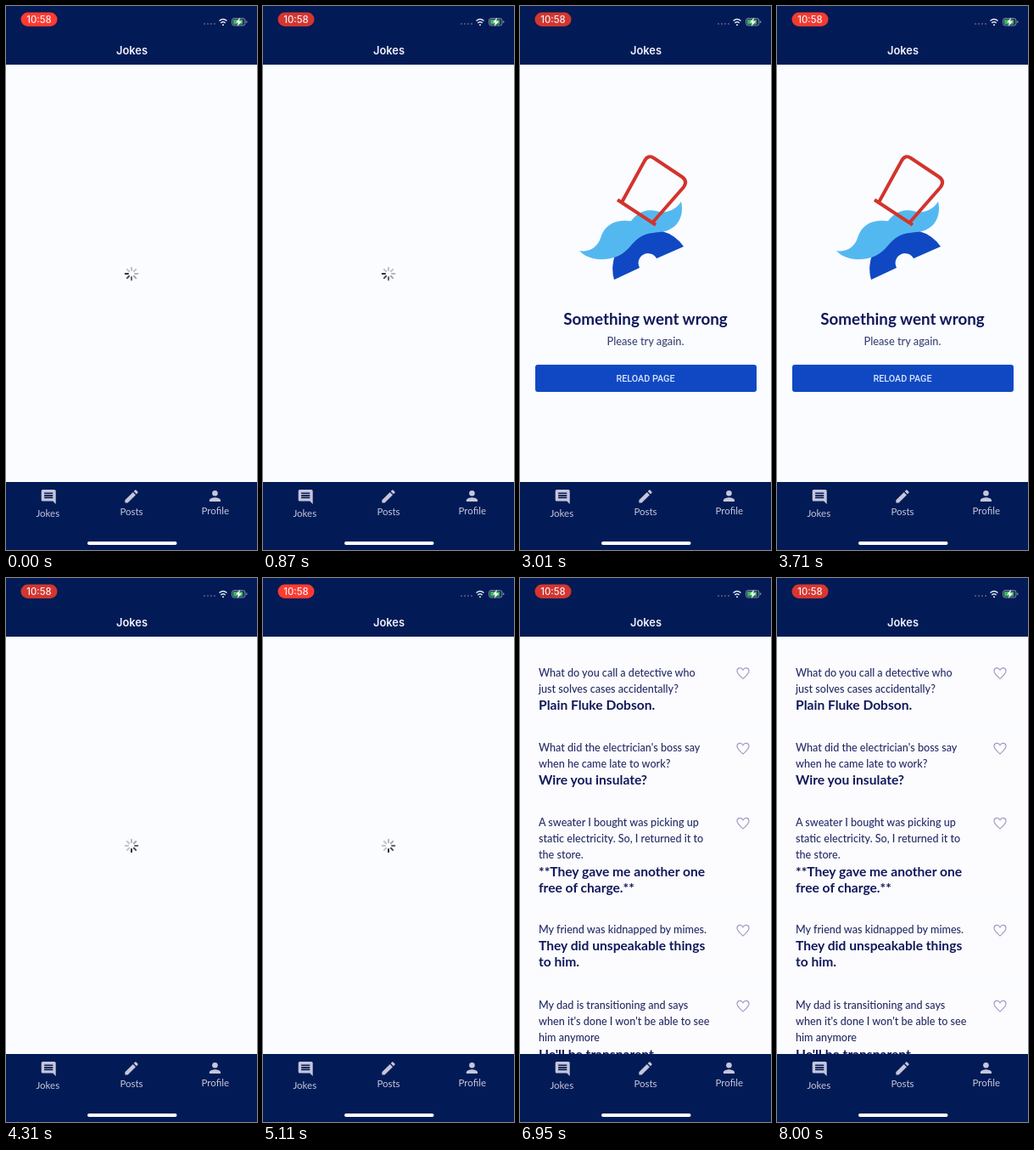
An HTML page that plays this animation: 296x640 px, repeating every 8050 ms.

```html
<!DOCTYPE html>
<html lang="en">
<head>
<meta charset="utf-8">
<title>Jokes</title>
<style>
  html, body { margin: 0; width: 100%; height: 100%; overflow: hidden; background: #fafcff; }
  svg { display: block; width: 296px; height: 640px; }
  text { font-family: Lato, "Open Sans", sans-serif; }
  .status, .title { font-family: Inter, Roboto, sans-serif; fill: #f0f0fa; text-anchor: middle; }
  .status { font-size: 11.3px; font-weight: 500; }
  .title { font-size: 12.9px; font-weight: 600; }
  .mid { text-anchor: middle; }
  .tabs { fill: #c6c6da; font-size: 11.5px; }
  .heading { font-size: 18.8px; font-weight: 700; fill: #10185a; }
  .hint { font-size: 12.8px; font-weight: 500; fill: #3c4474; }
  .button { font: 500 10.8px Roboto, sans-serif; fill: #d8e6fa; }
  .setup { font-size: 12.6px; font-weight: 500; fill: #242c66; }
  .punch { font-size: 15.6px; font-weight: 700; fill: #10185a; }
  .heart { fill: none; stroke: #a49cc8; stroke-width: 1.2; }
  .card { fill: #fcfcfe; }
</style>
</head>
<body>
<svg viewBox="0 0 296 640">
  <rect width="296" height="640" fill="#fafcff"/>

  <g id="loader" stroke-width="2" stroke-linecap="round" transform="translate(148 315)"></g>

  <g id="error">
    <path fill="#1048c4" d="M111 322A46 46 0 0 1 193 283L161 297A11 11 0 0 0 141 308Z"/>
    <path fill="#54b8f0" d="M70 288C82 290 91 284 95 273C99 259 111 250 131 253C138 243 149 238 160 241C172 245 184 240 190 230C194 247 186 261 171 265C160 267 152 266 143 271C131 278 129 288 116 294C101 301 80 299 70 288Z"/>
    <g fill="none" stroke="#d2342c" stroke-width="4">
      <path d="M120 231L147 182Q151 174.500 158 179L191 201Q198 206 193 213L157 254"/>
      <path d="M115 228L160 257.500"/>
    </g>
    <text class="mid heading" x="148" y="375">Something went wrong</text>
    <text class="mid hint" x="148" y="399">Please try again.</text>
    <rect x="18" y="422" width="261" height="32" rx="3" fill="#1048c4"/>
    <text class="mid button" x="148" y="442">RELOAD PAGE</text>
  </g>

  <g id="list"></g>

  <g fill="#021b56">
    <rect width="296" height="69"/>
    <rect y="560" width="296" height="80"/>
  </g>
  <rect id="pill" x="17.500" y="7.500" width="43" height="16.500" rx="8.250"/>
  <text class="status" x="39" y="20">10:58</text>
  <text class="title" x="148.500" y="57">Jokes</text>

  <path d="M233 21H247" stroke="#4c4880" stroke-width="2" stroke-dasharray="2 2"/>
  <g fill="none" stroke="#e4e4f2" stroke-width="1.500">
    <path d="M251.500 17.500Q256 13.500 260.500 17.500M253.300 20Q256 17.500 258.700 20"/>
    <path d="M255 22L256 23L257 22Z" fill="#e4e4f2" stroke-width="1"/>
  </g>
  <rect x="266.500" y="14.500" width="15.500" height="8.500" rx="2.500" fill="#26345c" stroke="#7c84a8"/>
  <rect x="268" y="16" width="11" height="5.500" rx="1" fill="#38b65c"/>
  <path d="M283.700 17.500V20" stroke="#7c84a8" stroke-width="1.300"/>
  <path d="M276 13.500L271 19.500H274L272.800 24L278 18H275Z" fill="#fff"/>

  <g class="tabs mid">
    <path transform="translate(40 567.300) scale(.85)" d="M22 4c0-1.100-.9-2-2-2H4c-1.100 0-2 .9-2 2v12c0 1.100.9 2 2 2h14l4 4zM18 14H6v-2h12zm0-3H6V9h12zm0-3H6V6h12z"/>
    <path transform="translate(137.800 566.700) scale(.85)" d="M3 17.250V21h3.750L17.810 9.940l-3.750-3.750zM20.710 7.040q.7-.7 0-1.410l-2.340-2.340q-.7-.7-1.410 0l-1.830 1.830 3.750 3.750z"/>
    <g transform="translate(236.600 566.700) scale(.82)">
      <circle cx="12" cy="8" r="4"/>
      <path d="M12 14c-2.670 0-8 1.340-8 4v2h16v-2c0-2.660-5.330-4-8-4z"/>
    </g>
    <text x="49.300" y="600.500">Jokes</text>
    <text x="148" y="599">Posts</text>
    <text x="246.800" y="598">Profile</text>
  </g>
  <rect x="96" y="630" width="105.500" height="4" rx="2" fill="#fff"/>
</svg>
<script>
const LOOP = 8050;
const ERROR_AT = 1000, RELOAD_AT = 4250, LIST_AT = 6800;
const SPOKES = 8, SPOKE_MS = 100;
const PULSE_MS = 1280;

// Each joke: baseline of its first line, setup lines, punchline lines
const jokes = [
  [115.5, ["What do you call a detective who", "just solves cases accidentally?"], ["Plain Fluke Dobson."]],
  [204, ["What did the electrician's boss say", "when he came late to work?"], ["Wire you insulate?"]],
  [292, ["A sweater I bought was picking up", "static electricity. So, I returned it to", "the store."],
    ["**They gave me another one", "free of charge.**"]],
  [418, ["My friend was kidnapped by mimes."], ["They did unspeakable things", "to him."]],
  [507, ["My dad is transitioning and says", "when it's done I won't be able to see", "him anymore"], ["He'll be transparent."]]
];

const get = id => document.getElementById(id);
const [loader, error, list, pill] = ["loader", "error", "list", "pill"].map(get);

function add(parent, tag, attrs, text = "") {
  const node = document.createElementNS("http://www.w3.org/2000/svg", tag);
  for (const key in attrs) node.setAttribute(key, attrs[key]);
  node.textContent = text;
  parent.append(node);
  return node;
}

for (const [top, setup, punch] of jokes) {
  const height = (setup.length + punch.length) * 19 + 22;
  add(list, "rect", { class: "card", x: 8, y: Math.round(top) - 25, width: 280, height });
  setup.forEach((line, i) => add(list, "text", { class: "setup", x: 22, y: top + i * 19 }, line));
  punch.forEach((line, i) =>
    add(list, "text", { class: "punch", x: 22, y: top + 1 + (setup.length + i) * 19.2 }, line));
  add(list, "path", {
    class: "heart",
    transform: `translate(263 ${top - 3.5})`,
    d: "M0 6.500C-4 3-7 .5-7-2.500C-7-6.500-2-7.500 0-3.800C2-7.500 7-6.500 7-2.500C7 .5 4 3 0 6.500Z"
  });
}

const spokes = Array.from({ length: SPOKES }, (_, i) =>
  add(loader, "path", { d: "M0-4V-7.300", transform: `rotate(${i * 360 / SPOKES})` }));

const show = (node, on) => node.setAttribute("display", on ? "inline" : "none");
const mix = (a, b, k) => Math.round(a + (b - a) * k);

function draw(t) {
  const failed = t >= ERROR_AT && t < RELOAD_AT;
  const loaded = t >= LIST_AT;
  show(error, failed);
  show(list, loaded);
  show(loader, !failed && !loaded);

  // The spinner starts afresh with the reload
  const head = t < ERROR_AT
    ? Math.floor(t / SPOKE_MS) + 6
    : Math.floor((t - RELOAD_AT) / SPOKE_MS + 3.9);
  spokes.forEach((spoke, i) => {
    const age = ((head - i) % SPOKES + SPOKES) % SPOKES;
    spoke.setAttribute("stroke", age < 3 ? "#30303c" : "#6c6c82");
    spoke.setAttribute("opacity", Math.max(0.4, 1 - age * 0.13));
  });

  const glow = ((1 + Math.cos(2 * Math.PI * t / PULSE_MS)) / 2) ** 3;
  pill.setAttribute("fill", `rgb(${mix(212, 255, glow)},${mix(54, 59, glow)},${mix(46, 48, glow)})`);
}

function tick() {
  draw(performance.now() % LOOP);
  requestAnimationFrame(tick);
}
tick();
</script>
</body>
</html>
```
